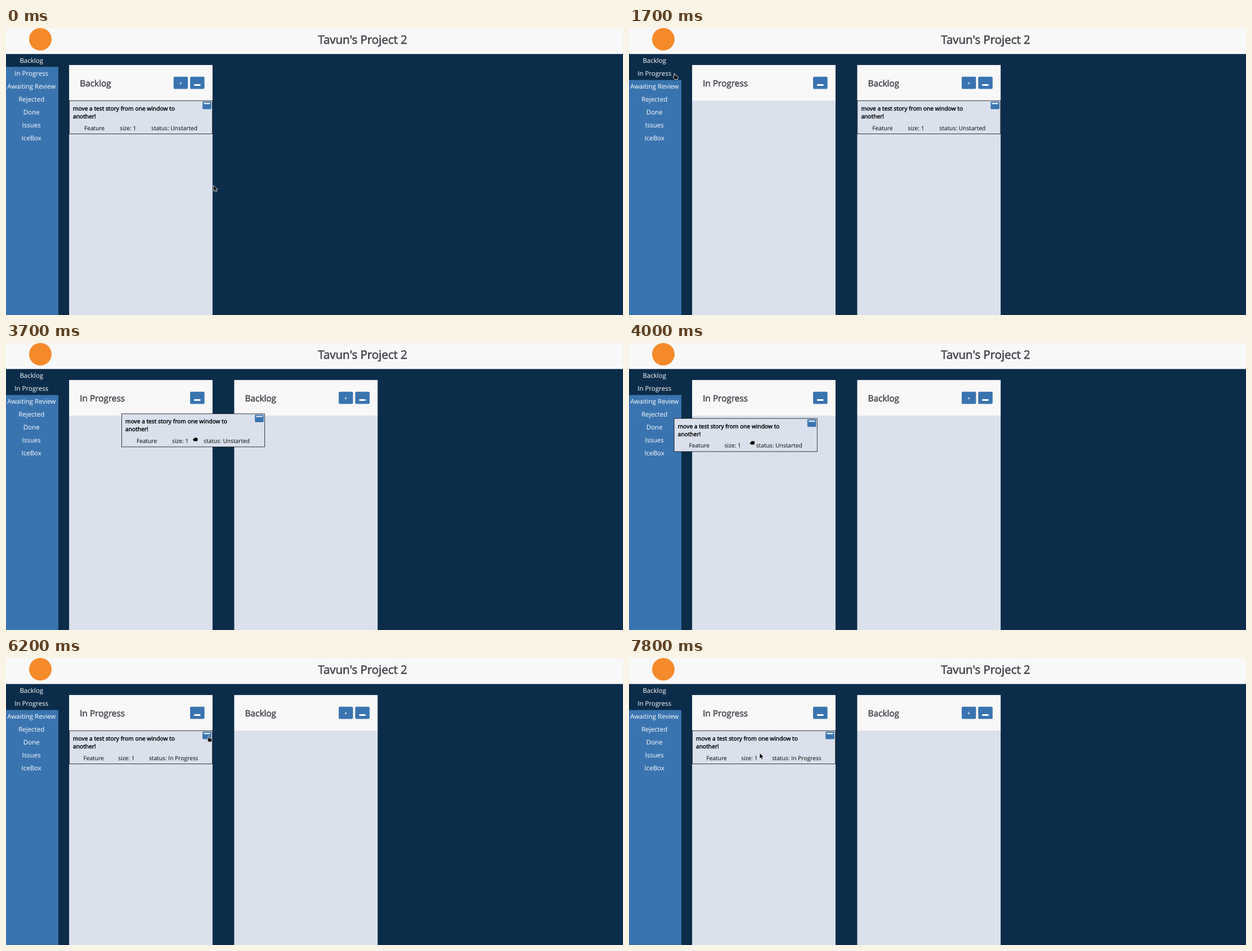
An HTML page that plays this animation: 1096x511 px, repeating every 8 s.

```html
<!DOCTYPE html>
<html lang="en">
<head>
<meta charset="utf-8">
<title>Story board</title>
<style>
  html, body { margin: 0; width: 100%; height: 100%; overflow: hidden; background: #0b2d4a; }
  svg { display: block; width: 100%; height: 100%; }
  text { font-family: "Open Sans", sans-serif; text-rendering: geometricPrecision; white-space: pre; }
  .nav { font-size: 11.52px; fill: #fff; text-anchor: middle; }
  .title { font-size: 20.48px; fill: #474b52; stroke: #474b52; stroke-width: .75; text-anchor: middle; }
  .head { font-size: 15.36px; fill: #474b52; stroke: #474b52; stroke-width: .58; }
  .story { font-size: 10.24px; }
  .bold { stroke: #000; stroke-width: .42; }
  .plus { font-size: 10.24px; fill: #fff; text-anchor: middle; }
  .frame { stroke: #000; stroke-width: .75; }
  .cursor { fill: #000; stroke: #fff; stroke-width: .8; stroke-linejoin: round; }
</style>
</head>
<body>
<svg id="stage" viewBox="0 0 1096 511" preserveAspectRatio="none"></svg>
<script>
const LOOP = 8000, STEP = 100;
const BLUE = '#3a74b0', NAVY = '#0b2d4a', PAPER = '#f9f8f9', PALE = '#dae1ec';
const LEFT = 112.1, RIGHT = 405.4, WIDTH = 254.8, CARD_Y = 129.2;
const stage = document.getElementById('stage');

function add(parent, tag, attrs = {}, text = '') {
  const el = document.createElementNS('http://www.w3.org/2000/svg', tag);
  for (const k in attrs) el.setAttribute(k, attrs[k]);
  el.textContent = text;
  parent.append(el);
  return el;
}
const rect = (p, x, y, width, height, fill, rx = 0) => add(p, 'rect', { x, y, width, height, fill, rx });
const label = (p, x, y, cls, text) => add(p, 'text', { x, y, class: cls }, text);
const place = (el, x, y) => el.setAttribute('transform', `translate(${x} ${y})`);
const mix = (a, b, u) => a + (b - a) * u;

// Eased progress of t from start to end, held outside
function ease(t, start, end) {
  const u = Math.min(1, Math.max(0, (t - start) / (end - start || 1)));
  return u * u * (3 - 2 * u);
}

// Header and side menu
rect(stage, 0, 0, 1096, 511, NAVY);
rect(stage, 0, 0, 1096, 46.3, PAPER);
add(stage, 'circle', { cx: 61, cy: 20, r: 20, fill: '#f58a2b' });
label(stage, 633.5, 28.2, 'title', "Tavun's Project 2");
rect(stage, 0, 69.2, 93, 442, BLUE);
const navShade = rect(stage, 0, 60, 93, 32.6, NAVY);
['Backlog', 'In Progress', 'Awaiting Review', 'Rejected', 'Done', 'Issues', 'IceBox']
  .forEach((name, i) => label(stage, 45.2, 62.3 + 22.97 * i, 'nav', name));

function makePanel(name, canAdd) {
  const g = add(stage, 'g');
  rect(g, 0, 129, WIDTH, 382, PALE);
  rect(g, 0, 65.9, WIDTH, 63.4, PAPER);
  label(g, 19.2, 103.8, 'head', name);
  if (canAdd) {
    rect(g, 185.6, 86.8, 25.4, 21.6, BLUE, 2);
    label(g, 198.3, 101.6, 'plus', '+');
  }
  rect(g, 214.9, 86.8, 25.6, 21.6, BLUE, 2);
  rect(g, 221.9, 100, 11.6, 3, '#fff', 1);
  return g;
}
const progress = makePanel('In Progress', false);
const backlog = makePanel('Backlog', true);
place(progress, LEFT, 0);

// Story card, drawn from its own top left corner
const card = add(stage, 'g');
const frame = rect(card, .35, .35, WIDTH - .7, 59, PALE);
frame.setAttribute('class', 'frame');
label(card, 7, 17.8, 'story bold', 'move a test story from one window to');
label(card, 7, 31.8, 'story bold', 'another!');
const details = ['Feature', 'size: 1', ''].map(s => label(card, 0, 52.6, 'story', s));
rect(card, 237, 1.8, 15.6, 13.6, BLUE, 1.5);
rect(card, 239.2, 3.9, 11.2, 2.6, PALE, .5);

// Spread the details with equal gaps
function setStatus(text) {
  if (details[2].textContent === text) return;
  details[2].textContent = text;
  const widths = details.map(d => d.getComputedTextLength());
  const gap = (WIDTH - widths.reduce((a, b) => a + b)) / 4;
  let x = gap;
  details.forEach((d, i) => {
    d.setAttribute('x', x);
    x += widths[i] + gap;
  });
}

const shapes = {
  arrow: 'M0 0V10.6L2.5 8.4L4.1 12.2L5.9 11.4L4.3 7.7H7.6Z',
  hand: 'M0 .7Q.9 -.5 1.8 .7V4L6 4.8Q7.2 5.2 7 6.6L6.2 11H1.2L-1.6 7.2Q-1.6 5.9 0 6.7Z',
  grab: 'M-2.6 -3.4Q1 -4.6 4.6 -2.8V1L3.6 3.4H-2.4L-4.8 .6V-1H-2.6Z'
};
const cursor = add(stage, 'path', { class: 'cursor' });

// Cursor trips outside the drag: start time, end time, destination
const trips = [
  [0, 1000, 80, 80.5],
  [1700, 2400, 463, 244],
  [2500, 3000, 522, 178],
  [4200, 4200, 233, 178],
  [4300, 4900, 276, 234],
  [5300, 6200, 358.8, 138.5],
  [6800, 7800, 232, 169]
];
function cursorAt(t) {
  let x = 368.6, y = 280;
  for (const [start, end, toX, toY] of trips) {
    if (t < start) break;
    const u = ease(t, start, end);
    x = mix(x, toX, u);
    y = mix(y, toY, u);
  }
  return [x, y];
}

// The card sways as it is pulled left, then swings back before the drop
function dragAt(t) {
  const u = ease(t, 3300, 4000), back = ease(t, 4000, 4120);
  const y = mix(134.9, 133.9, u) + 14 * Math.sin(2 * Math.PI * u);
  return {
    card: [mix(398.2, 79.8, u) + 30 * back, y],
    hand: [mix(517, 219, u) + 14 * back, y + mix(49.6, 44, u)]
  };
}

function draw(ms) {
  const t = Math.floor(ms % LOOP / STEP) * STEP;
  const opened = t >= 1700, dragged = t >= 3300 && t < 4400, moved = t >= 4500;
  const expanded = t >= 6300 && t < 6900;
  const drag = dragAt(t);

  navShade.setAttribute('opacity', ease(t, 800, 1000));
  progress.setAttribute('display', opened ? 'inline' : 'none');
  const backlogX = opened ? RIGHT : LEFT;
  place(backlog, backlogX, 0);

  place(card, ...(dragged ? drag.card : [moved ? LEFT : backlogX, CARD_Y]));
  frame.setAttribute('height', expanded ? 400 : 59);
  setStatus(moved ? 'status: In Progress' : 'status: Unstarted');

  const [x, y] = dragged ? drag.hand : cursorAt(t);
  const onLink = x < 93 || (x > 349 && y < 145);
  cursor.setAttribute('d', shapes[dragged ? 'grab' : onLink ? 'hand' : 'arrow']);
  place(cursor, x, y);
}

function tick(now) {
  draw(now);
  requestAnimationFrame(tick);
}
draw(0);
requestAnimationFrame(tick);
</script>
</body>
</html>
```
